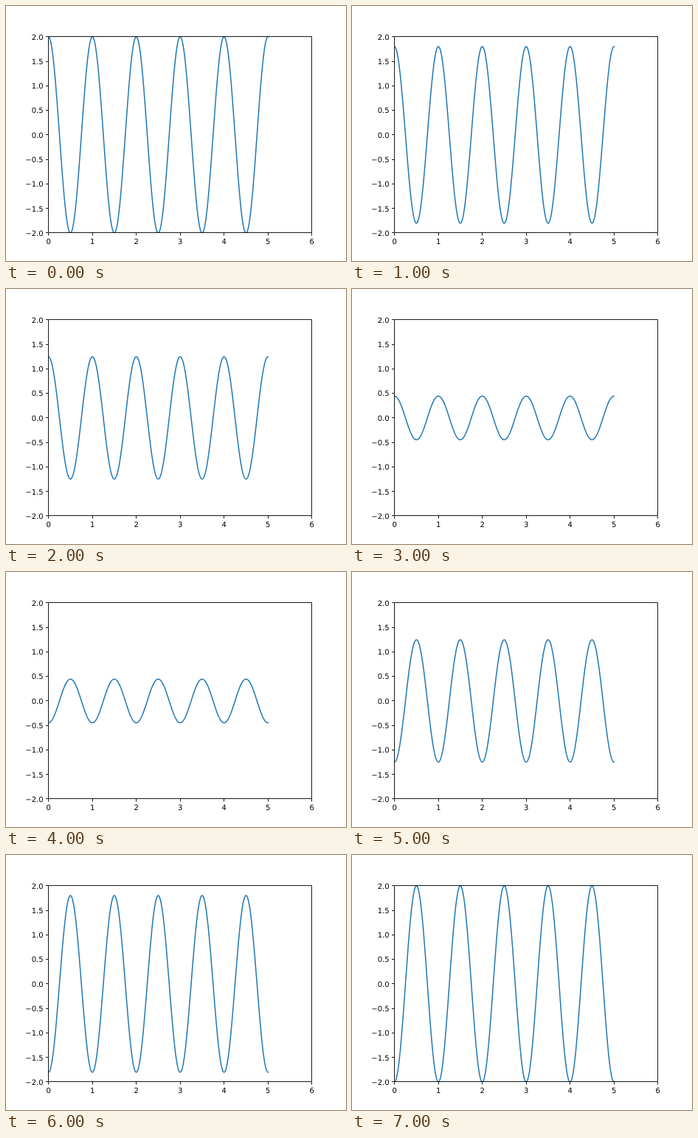
An HTML page for the animation above (7500 ms loop, 461 px wide and 346 px high).

```html
<!DOCTYPE html>
<html lang="en">
<head>
<meta charset="utf-8">
<title>Standing wave</title>
<style>
html, body { margin: 0; width: 100%; height: 100%; overflow: hidden; background: #fff; }
svg { display: block; }
text { font: 10px "DejaVu Sans", sans-serif; text-rendering: geometricPrecision; }
</style>
</head>
<body>
<svg width="461" height="346" viewBox="0 0 461 346">
  <clipPath id="plot"><rect x="57.6" y="41.6" width="357.1" height="266.4"/></clipPath>
  <path id="wave" clip-path="url(#plot)" fill="none" stroke="#1f77b4" stroke-width="1.5"
    stroke-linecap="square" stroke-linejoin="round"/>
  <path id="axes" fill="none" stroke="#000" stroke-opacity=".9"/>
  <g id="labels"></g>
</svg>
<script>
const $ = id => document.getElementById(id);
const X = x => 57.6 + 59.52 * x;
const Y = y => 174.93 - 66.528 * y;
const snap = v => Math.floor(v) + 0.5;

function label(x, y, anchor, value) {
  const el = document.createElementNS("http://www.w3.org/2000/svg", "text");
  el.setAttribute("x", x);
  el.setAttribute("y", y);
  el.setAttribute("text-anchor", anchor);
  el.textContent = value;
  $("labels").append(el);
}

let axes = "M57.5 41.5H414.5V307.5H57.5Z";
for (let x = 0; x <= 6; x++) {
  axes += `M${snap(X(x))} 308v3.5`;
  label(X(x), 322.6, "middle", x);
}
for (let y = -2; y <= 2; y += 0.5) {
  axes += `M57 ${snap(Y(y))}h-3`;
  label(50.6, Y(y) + 3.8, "end", y.toFixed(1).replace("-", "\u2212"));
}
$("axes").setAttribute("d", axes);

const STEP = 500, COUNT = 15, SAMPLES = 500;
let shown = -1;

function draw(now) {
  const step = Math.floor(now / STEP) % COUNT;
  if (step !== shown) {
    shown = step;
    const amp = 2 * Math.cos(Math.PI * step / (COUNT - 1));
    const points = Array.from({ length: SAMPLES + 1 }, (_, i) => {
      const x = 5 * i / SAMPLES;
      return X(x).toFixed(2) + " " + Y(amp * Math.cos(2 * Math.PI * x)).toFixed(2);
    });
    $("wave").setAttribute("d", "M" + points.join("L"));
  }
  requestAnimationFrame(() => draw(performance.now() - start));
}

const start = performance.now();
draw(0);
</script>
</body>
</html>
```
